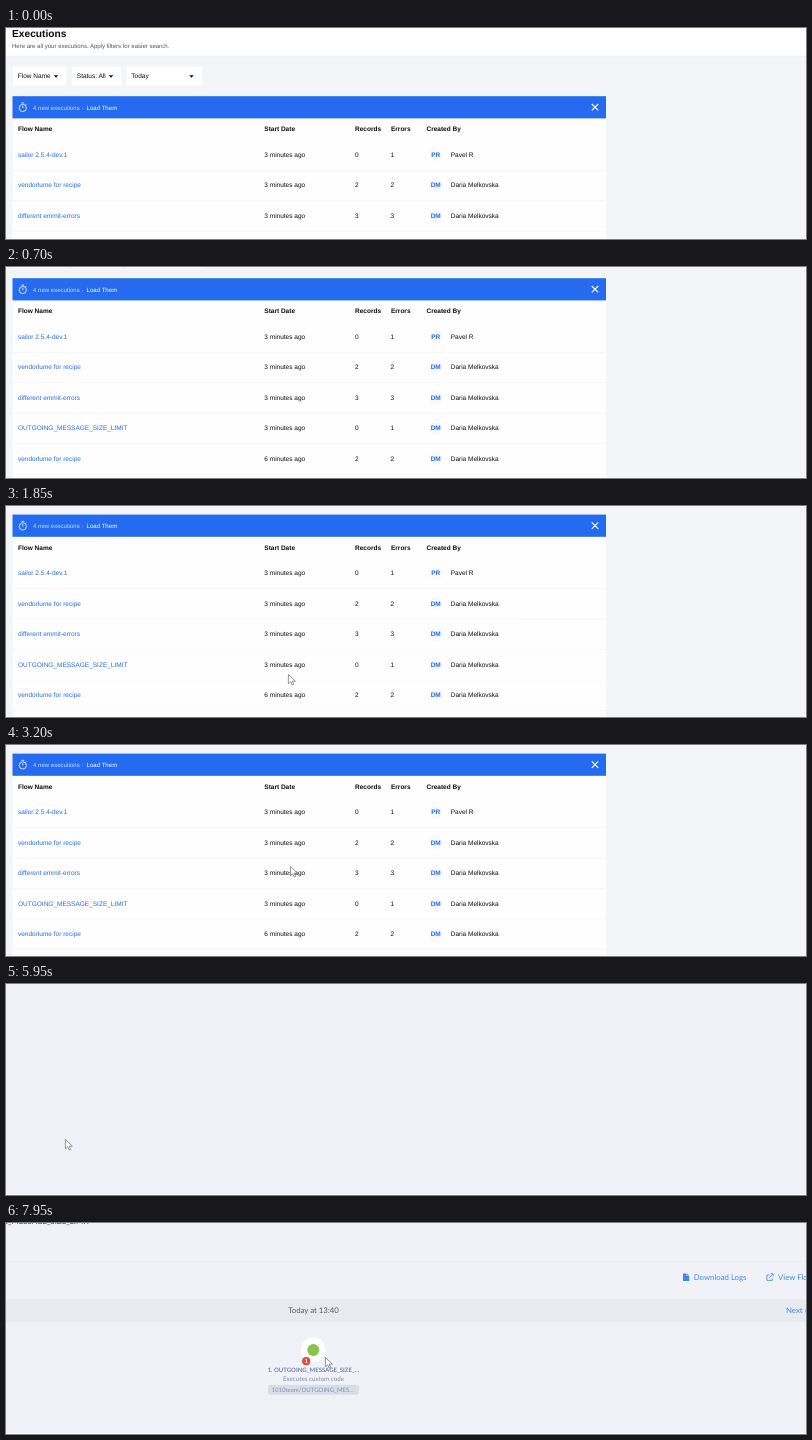
Animation, 800 px wide and 211 px high, one loop 8 s. Source, as an HTML page:

```html
<!DOCTYPE html>
<html lang="en">
<head>
<meta charset="utf-8">
<title>Executions</title>
<style>
  html, body { margin: 0; width: 100%; height: 100%; overflow: hidden; background: #f3f5f8; }
  svg { display: block; width: 800px; height: 211px; text-rendering: geometricPrecision; }
  #list { font: 6.5px "Liberation Sans", Arial, sans-serif; fill: #0c0c0c; }
  #detail { font: 7.8px Lato, "Open Sans", sans-serif; fill: #3f8ae8; }
  .b { font-weight: bold; }
  .link { fill: #246be8; }
  .mid { text-anchor: middle; }
</style>
</head>
<body>
<svg viewBox="0 0 800 211">
  <rect width="800" height="211" fill="#f3f5f8"/>

  <g id="list">
    <rect y="-5" width="800" height="33" fill="#fff"/>
    <rect y="27.8" width="800" height=".6" fill="#e6e8ec"/>
    <text class="b" x="6" y="9" font-size="10.2">Executions</text>
    <text x="6" y="20" font-size="6.03" fill="#555">Here are all your executions. Apply filters for easier search.</text>
    <g id="filters"></g>
    <rect x="6.5" y="90" width="593.5" height="250" fill="#fefefe"/>
    <rect x="6.5" y="68.2" width="593.5" height="22.2" fill="#246bf0"/>
    <g fill="none" stroke="#fff" stroke-width=".8">
      <circle cx="16.8" cy="80" r="3.6"/>
      <path d="M15.4 75h2.8M16.8 77.8v2.4M19.4 77.1l.9-.9"/>
      <path d="M585.8 76l6.4 6.4m0-6.4l-6.4 6.4" stroke-width="1.1"/>
    </g>
    <text x="27" y="81.6" font-size="6.05" fill="#c6d9fc">4 new executions ·</text>
    <text x="80.5" y="81.6" font-size="6.1" fill="#fff">Load Them</text>
    <g id="table"></g>
  </g>

  <g id="detail" opacity="0">
    <rect width="800" height="211" fill="#f0f2f7"/>
    <rect y="210" width="800" height="1" fill="#fff"/>
    <g id="flow" opacity="0">
      <text x="84" y="1" text-anchor="end" fill="#444">OUTGOING_MESSAGE_SIZE_LIMIT</text>
      <rect y="38" width="800" height=".6" fill="#ebedf1"/>
      <rect y="76.5" width="800" height="22" fill="#e8eaef"/>
      <path d="M677 50.5h3.6v2.4h2.6v5h-6.2zM681.2 50.5l2 1.9h-2z"/>
      <text x="687.7" y="56.8">Download Logs</text>
      <path d="M763.5 52h-2.6v5.4h5.4v-2.2M764.5 50.8h2.6v2.6M767 51l-3.8 3.8" fill="none" stroke="#3f8ae8" stroke-width=".8"/>
      <text x="772" y="56.8">View Flow</text>
      <text class="mid" x="307.5" y="90.3" fill="#555b63">Today at 13:40</text>
      <text x="780" y="90.3">Next ›</text>
      <circle cx="307.3" cy="127" r="12.4" fill="#fff"/>
      <circle cx="307.3" cy="127" r="6" fill="#8bc34a"/>
      <circle cx="300.2" cy="138.2" r="4.1" fill="#e2483f"/>
      <text class="mid b" x="300.2" y="140.3" font-size="6" fill="#fff">1</text>
      <text class="mid b" x="307.5" y="149.3" font-size="6" fill="#7480a0">1. OUTGOING_MESSAGE_SIZE_…</text>
      <text class="mid" x="307.5" y="157.8" font-size="6.25" fill="#7d88a6">Executes custom code</text>
      <rect x="262" y="161.8" width="91" height="10" rx="2" fill="#d9dde8"/>
      <text class="mid" x="306.5" y="168.8" font-size="6.05" fill="#8590ac">1010team/OUTGOING_MES...</text>
    </g>
  </g>

  <g id="cursor" fill="#fff" stroke="#6a6a6a" stroke-width=".7" stroke-linejoin="round">
    <path id="arrow" d="M.4 .4V9.8L2.7 7.8L4.2 11.1L5.7 10.4L4.2 7.2H7.4Z"/>
    <path id="hand" d="M.4 .8Q1 0 1.6 .8V4.4L5.8 5.4Q6.6 5.8 6.4 7L5.6 11H1.2L-1.6 7.4Q-1.6 6.2 -.5 6.8L.4 7.6Z"/>
  </g>
</svg>
<script>
const $ = id => document.getElementById(id);
const label = (x, y, str, cls = '') => `<text class="${cls}" x="${x}" y="${y}">${str}</text>`;

const filter = (x, width, str) =>
  `<rect x="${x}" y="38.8" width="${width}" height="19" fill="#fff"/>` +
  label(x + 5, 50.4, str) +
  `<path d="M${x + width - 12.5} 47.2h4.4l-2.2 2.6z"/>`;

$('filters').innerHTML =
  filter(6.8, 53.5, 'Flow Name') + filter(65.8, 49.5, 'Status: All') + filter(120.3, 75.5, 'Today');

const cols = { 'Flow Name': 12, 'Start Date': 258.3, 'Records': 349, 'Errors': 385, 'Created By': 420.5 };
const people = { PR: 'Pavel R', DM: 'Daria Melkovska' };
const rows = [
  ['sailor 2.5.4-dev.1', 3, 0, 1, 'PR'],
  ['vendorlume for recipe', 3, 2, 2, 'DM'],
  ['different emmit-errors', 3, 3, 3, 'DM'],
  ['OUTGOING_MESSAGE_SIZE_LIMIT', 3, 0, 1, 'DM'],
  ['vendorlume for recipe', 6, 2, 2, 'DM'],
];

function row([name, ago, records, errors, who], i) {
  const y = 129 + i * 30.45;
  const [nameX, dateX, recordsX, errorsX, byX] = Object.values(cols);
  return `<rect x="6.5" y="${y + 13}" width="593.5" height=".6" fill="#f4f5f8"/>` +
    label(nameX, y, name, 'link') +
    label(dateX, y, `${ago} minutes ago`) +
    label(recordsX, y, records) +
    label(errorsX - .5, y, errors) +
    `<circle cx="${byX + 9.2}" cy="${y - 2}" r="7" fill="#f9fafe"/>` +
    label(byX + 9.2, y, who, 'b link mid') +
    label(byX + 24.2, y, people[who]);
}

$('table').innerHTML =
  Object.entries(cols).map(([str, x]) => label(x, 103.2, str, 'b')).join('') +
  rows.map(row).join('');

const ramp = (t, from, to) => Math.min(1, Math.max(0, (t - from) / (to - from)));
const ease = k => k * k * (3 - 2 * k);
const scroll = t => 59.6 / (1 + Math.exp((552 - t) / 48));

// Pointer moves: start and end in ms, goal, upward bow of the path
const entry = { x: 484, y: 214 };
const moves = [
  { from: 1100, to: 1850, x: 282, y: 168, bow: 25 },
  { from: 2100, to: 2300, x: 283, y: 214, bow: 0 },
  { from: 2680, to: 2900, x: 315, y: 90, bow: 0 },
  { from: 3000, to: 3200, x: 284, y: 121, bow: 0 },
  { from: 3200, to: 3750, x: 59, y: 155, bow: -45 },
  { from: 5950, to: 6750, x: 359, y: 127, bow: 60 },
  { from: 6850, to: 7100, x: 367, y: 146, bow: 0 },
  { from: 7700, to: 7950, x: 319, y: 134, bow: 0 },
];

function pointer(t) {
  let { x, y } = entry;
  for (const m of moves) {
    const k = ease(ramp(t, m.from, m.to));
    x += (m.x - x) * k;
    y += (m.y - y) * k - m.bow * 4 * k * (1 - k);
  }
  return `${x} ${y}`;
}

function draw(time) {
  const t = Math.floor(time / 50) * 50;
  const overLink = t >= 3700 && t < 4550;
  $('list').setAttribute('transform', `translate(0 ${-scroll(t)})`);
  $('detail').setAttribute('opacity', ramp(t, 4500, 4600));
  $('flow').setAttribute('opacity', ramp(t, 7350, 7500));
  $('cursor').setAttribute('transform', `translate(${pointer(t)})`);
  $('arrow').style.display = overLink ? 'none' : '';
  $('hand').style.display = overLink ? '' : 'none';
}

const start = performance.now();
function tick() {
  draw((performance.now() - start) % 8000);
  requestAnimationFrame(tick);
}
tick();
</script>
</body>
</html>
```
